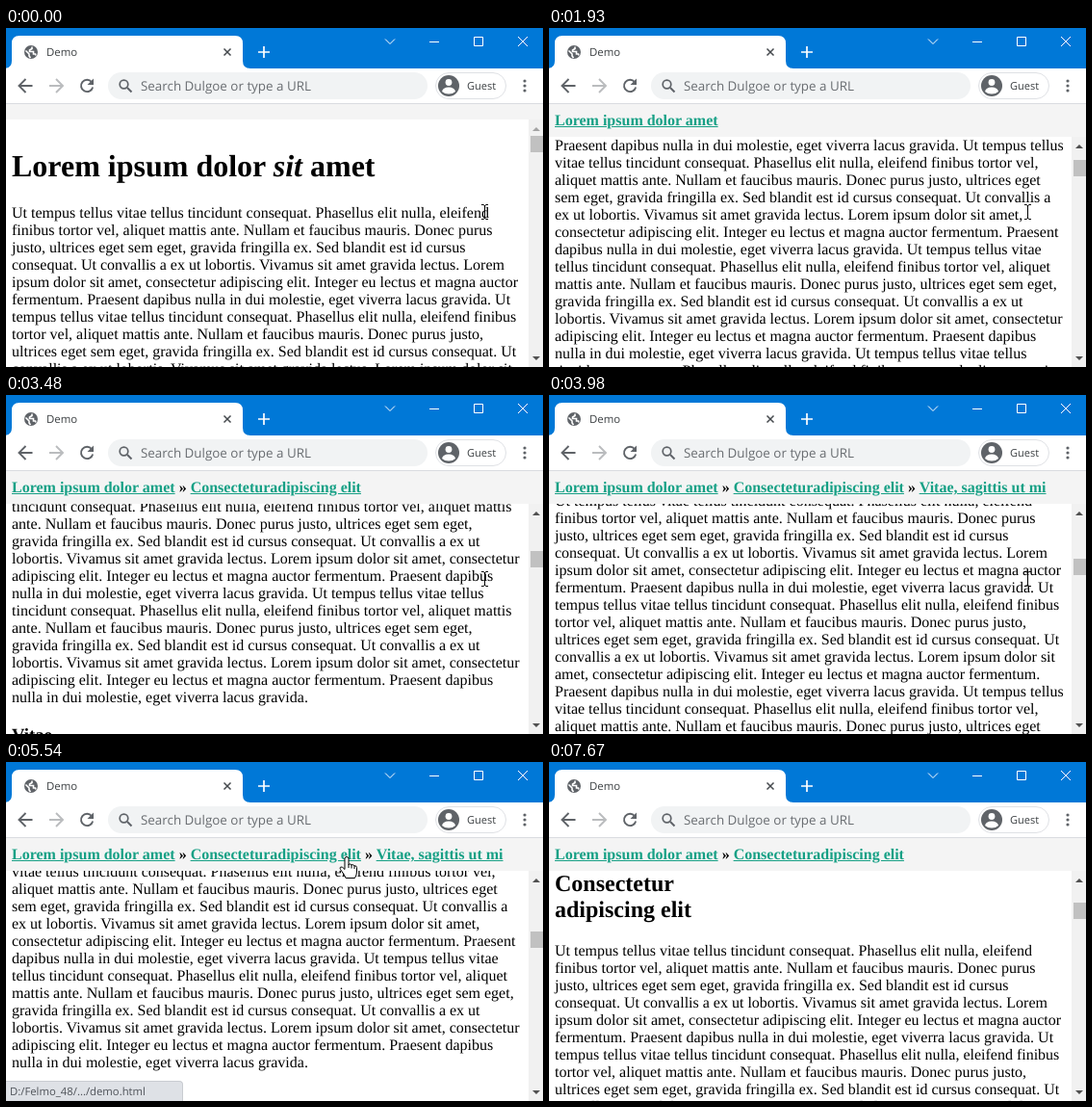
These frames come from a looping animation (558 by 352 pixels, 8790 ms). An HTML page:

```html
<!DOCTYPE html>
<html lang="en">
<head>
<meta charset="utf-8">
<title>Demo</title>
<style>
  html, body { margin: 0; width: 100%; height: 100%; overflow: hidden; background: #fff; }
  #stage {
    position: relative; width: 558px; height: 352px; overflow: hidden; background: #fff;
    font: 16px/18px "Liberation Serif", "Times New Roman", serif; color: #000;
    text-rendering: geometricPrecision; white-space: nowrap; cursor: none;
  }
  #stage > * { position: absolute; }
  #view { left: 0; width: 543px; bottom: 0; overflow: hidden; }
  #page { position: absolute; left: 6px; top: 1px; padding-top: 8px; will-change: transform; }
  p { margin: 0; }
  h1 { font-size: 32px; line-height: 37px; margin: 21px 0 22px; }
  h2 { font-size: 24px; line-height: 27px; margin: 20px 0; }
  h3 { font-size: 18.72px; line-height: 21.5px; margin: 19px 0 18px; }
  #crumbs { left: 0; top: 79px; width: 552px; padding: 9px 0 7px 6px; background: #f4f4f4; font-weight: bold; }
  #crumbs a { color: #16a085; text-decoration: underline; }
  #bar { left: 543px; width: 15px; bottom: 0; background: #f1f1f1; }
  #thumb { position: absolute; left: 2px; width: 13px; height: 17px; background: #c1c1c1; }
  #bar i { position: absolute; left: 4px; border: 0 solid transparent; border-width: 0 4px; }
  #bar #up { top: 8px; border-bottom: 4px solid #505050; }
  #bar #down { bottom: 7px; border-top: 4px solid #505050; }
  #chrome, #pointer { left: 0; top: 0; }
  #chrome text, #status { font-family: "Open Sans", "Noto Sans", sans-serif; }
  #status {
    left: -1px; top: 331px; height: 21px; box-sizing: border-box; padding-left: 4px; overflow: hidden;
    border: 1px solid #c9ccd1; border-bottom: 0; border-radius: 0 4px 0 0;
    background: #dee1e6; color: #50545a; font-size: 11.3px; line-height: 21px;
  }
</style>
</head>
<body>
<div id="stage">
  <div id="view"><div id="page">
    <h1>Lorem ipsum dolor <em>sit</em> amet</h1>
    <p data-repeat="5"></p>
    <h2>Consectetur<br>adipiscing elit</h2>
    <p data-repeat="7"></p>
    <h3>Vitae, <br>sagittis ut mi</h3>
    <p data-repeat="4"></p>
  </div></div>
  <div id="crumbs"></div>
  <div id="bar"><i id="up"></i><div id="thumb"></div><i id="down"></i></div>

  <svg id="chrome" width="558" height="79" fill="none">
    <path d="M0 0H558V42H0Z" fill="#0078d7"/>
    <path d="M0 42H558V79H0Z" fill="#fff"/>
    <path d="M0 78H558V79H0Z" fill="#dadce0"/>
    <path d="M-2 42Q6 42 6 34V16Q6 8 14 8H238Q246 8 246 16V34Q246 42 254 42Z" fill="#fff"/>
    <!-- tab -->
    <circle cx="26" cy="25" r="7" fill="#5f6368"/>
    <path d="M20.5 23.5L24 27V29L25.5 31M27 19.5V21.5L24.5 23V24.5H28.5V27H30.5L31 28.5" stroke="#fff" stroke-width="1.6"/>
    <text x="42" y="29" font-size="11.4" fill="#3c4043">Demo</text>
    <path d="M226.5 21.5L233.5 28.5M233.5 21.5L226.5 28.5" stroke="#45494d" stroke-width="1.5"/>
    <path d="M262 25H274M268 19V31" stroke="#fff" stroke-width="1.7"/>
    <!-- window buttons -->
    <path d="M394 11.5L399 16.5L404 11.5M440 14.5H450M486.5 9.5H495.5V18.5H486.5ZM532 9L542 19M542 9L532 19" stroke="#fff"/>
    <!-- toolbar -->
    <path d="M27.5 60H14M20.5 53L13.5 60L20.5 67" stroke="#5f6368" stroke-width="1.9"/>
    <path d="M45 60H58.5M52 53L59 60L52 67" stroke="#babcbe" stroke-width="1.9"/>
    <path d="M89 56A6.2 6.2 0 1 0 90.2 61.5" stroke="#5f6368" stroke-width="1.9"/>
    <path d="M91 52.5V59H84.5Z" fill="#5f6368"/>
    <rect x="106" y="46" width="332" height="28" rx="14" fill="#f1f3f4"/>
    <path d="M126 62L130.5 66.5" stroke="#5f6368" stroke-width="2"/>
    <circle cx="122.5" cy="58.5" r="4.3" stroke="#5f6368" stroke-width="1.7"/>
    <text x="140" y="65" font-size="13.4" fill="#696d71">Search Dulgoe or type a URL</text>
    <rect x="446.5" y="46.5" width="73" height="27" rx="13.5" fill="#fff" stroke="#dfe1e5"/>
    <circle cx="460" cy="60" r="11" fill="#5f6368"/>
    <circle cx="460" cy="56.5" r="3.4" fill="#fff"/>
    <path d="M453 66Q454 61.5 460 61.5T467 66Q464 68.5 460 68.5T453 66Z" fill="#fff"/>
    <text x="479" y="64" font-size="11" fill="#3c4043">Guest</text>
    <path d="M539 55V65.1" stroke="#5f6368" stroke-width="3.2" stroke-linecap="round" stroke-dasharray="0 5"/>
  </svg>

  <div id="status"></div>
  <svg id="pointer" width="558" height="352">
    <path id="ibeam" d="M-3 -7.5H-1L.5 -6.5L2 -7.5H4M.5 -7V7M-3 7.5H-1L.5 6.5L2 7.5H4" fill="none" stroke="#000"/>
    <path id="arrow" d="M-.5 -.5V16L3.3 12.4L6 19L8.6 17.9L5.9 11.5H11.2Z" fill="#fff" stroke="#000"/>
    <g id="hand">
      <path d="M-2 1.5Q-2 -.5 0 -.5T2 1.5V7.5Q4 6 5 8Q7 6.7 8 9Q10 8 10.5 10.5V15Q10.5 18 8.5 21.5H-1Q-2 18.5 -5.5 14Q-8 10.5 -6 10Q-4.5 9.5 -2 12.5Z" fill="#fff" stroke="#000"/>
      <path d="M2 7V11M5 8V11.5M8 9V12" stroke="#000"/>
    </g>
  </svg>
</div>

<script>
const LOOP = 8790, TICK = 50;
const $ = id => document.getElementById(id);

const lorem = 'Ut tempus tellus vitae tellus tincidunt consequat. Phasellus elit nulla, eleifend finibus ' +
  'tortor vel, aliquet mattis ante. Nullam et faucibus mauris. Donec purus justo, ultrices eget sem eget, ' +
  'gravida fringilla ex. Sed blandit est id cursus consequat. Ut convallis a ex ut lobortis. Vivamus sit ' +
  'amet gravida lectus. Lorem ipsum dolor sit amet, consectetur adipiscing elit. Integer eu lectus et magna ' +
  'auctor fermentum. Praesent dapibus nulla in dui molestie, eget viverra lacus gravida. ';

// Wrap at ten times the size so that hinting cannot move a break.
const pen = document.createElement('canvas').getContext('2d');
pen.font = '160px "Liberation Serif", "Times New Roman", serif';

function wrap(text, width) {
  const lines = [];
  let line = '';
  for (const word of text.trim().split(' ')) {
    const next = line ? line + ' ' + word : word;
    if (line && pen.measureText(next).width > width * 10) {
      lines.push(line);
      line = word;
    } else line = next;
  }
  return lines.concat(line).join('<br>');
}

for (const p of document.querySelectorAll('p')) {
  p.innerHTML = wrap(lorem.repeat(p.dataset.repeat), 529.2);
}

const blocks = [...$('page').children].map(el => ({ el, top: el.offsetTop, end: el.offsetTop + el.offsetHeight }));
const plainText = el => [...el.childNodes].filter(n => n.nodeType === 3).map(n => n.data).join('');
const heads = blocks.filter(b => b.el.tagName !== 'P').map(b => ({ top: b.top, text: plainText(b.el) }));
const target = heads[1].top;

const ramp = (t, a, b) => Math.max(0, Math.min(1, (t - a) / (b - a)));
const smooth = u => u * u * (3 - 2 * u);
const mix = (a, b, u) => a + (b - a) * u;
const tick = t => Math.floor(t / TICK) * TICK;

// Wheel turns slow down gently, the jump to a heading more sharply.
const WHEEL = 2, JUMP = 3;
const moves = [
  { at: 420, time: 1, to: 8, power: WHEEL },
  { at: 1050, time: 810, to: 286, power: WHEEL },
  { at: 1960, time: 810, to: 651, power: WHEEL },
  { at: 2830, time: 850, to: 1304, power: WHEEL },
  { at: 3730, time: 750, to: 1782, power: WHEEL },
  { at: 5950, time: 1, to: 1780, power: JUMP },
  { at: 6110, time: 480, to: target, power: JUMP }
];

function scrollAt(t) {
  let s = 0;
  for (const m of moves) {
    if (t < m.at) break;
    const u = t >= m.at + m.time ? 1 : tick(t - m.at) / m.time;
    s = mix(s, m.to, 1 - (1 - u) ** m.power);
  }
  return Math.round(s);
}

function mouseAt(t) {
  const toLink = smooth(ramp(t, 4700, 5300));
  const away = smooth(ramp(t, 7100, 7650));
  return [
    Math.round(mix(mix(497, 354, toLink), 506, away)),
    Math.round(mix(mix(191, 99, toLink), 390, away))
  ];
}

function pointerKind(x, y, top, s) {
  if (y >= top) {
    const at = y - top + s;
    return blocks.some(b => at >= b.top && at < b.end) ? 'ibeam' : 'arrow';
  }
  const over = y > 86 && y < 106 &&
    [...$('crumbs').children].some(a => x >= a.offsetLeft && x <= a.offsetLeft + a.offsetWidth);
  return over ? 'hand' : 'arrow';
}

let shown = -1;
function draw(t) {
  const s = scrollAt(t), beat = tick(t);
  const depth = heads.filter(h => s >= h.top).length;
  const top = depth ? 113 : 95;

  if (depth !== shown) {
    shown = depth;
    $('crumbs').innerHTML = heads.slice(0, depth).map(h => `<a>${h.text}</a>`).join(' » ');
    $('view').style.top = $('bar').style.top = top + 'px';
  }
  $('page').style.transform = `translateY(${-s}px)`;
  $('thumb').style.top = 17 + Math.floor(s / 38.5) + 'px';
  $('up').style.borderBottomColor = s ? '#505050' : '#a3a3a3';

  $('status').style.opacity = ramp(beat, 5200, 5500) - ramp(beat, 7100, 7350);
  $('status').style.width = mix(185, 258, ramp(beat, 6800, 6900)) + 'px';
  $('status').textContent = `D:/Felmo_48/${beat > 6800 ? 'pages/breadcrumbs' : '...'}/demo.html`;

  const [x, y] = mouseAt(beat);
  const kind = pointerKind(x, y, top, s);
  for (const id of ['ibeam', 'arrow', 'hand']) {
    $(id).style.display = id === kind ? '' : 'none';
    $(id).setAttribute('transform', `translate(${x} ${y})`);
  }
}

const start = performance.now();
function frame() {
  draw((performance.now() - start) % LOOP);
  requestAnimationFrame(frame);
}
frame();
</script>
</body>
</html>
```
